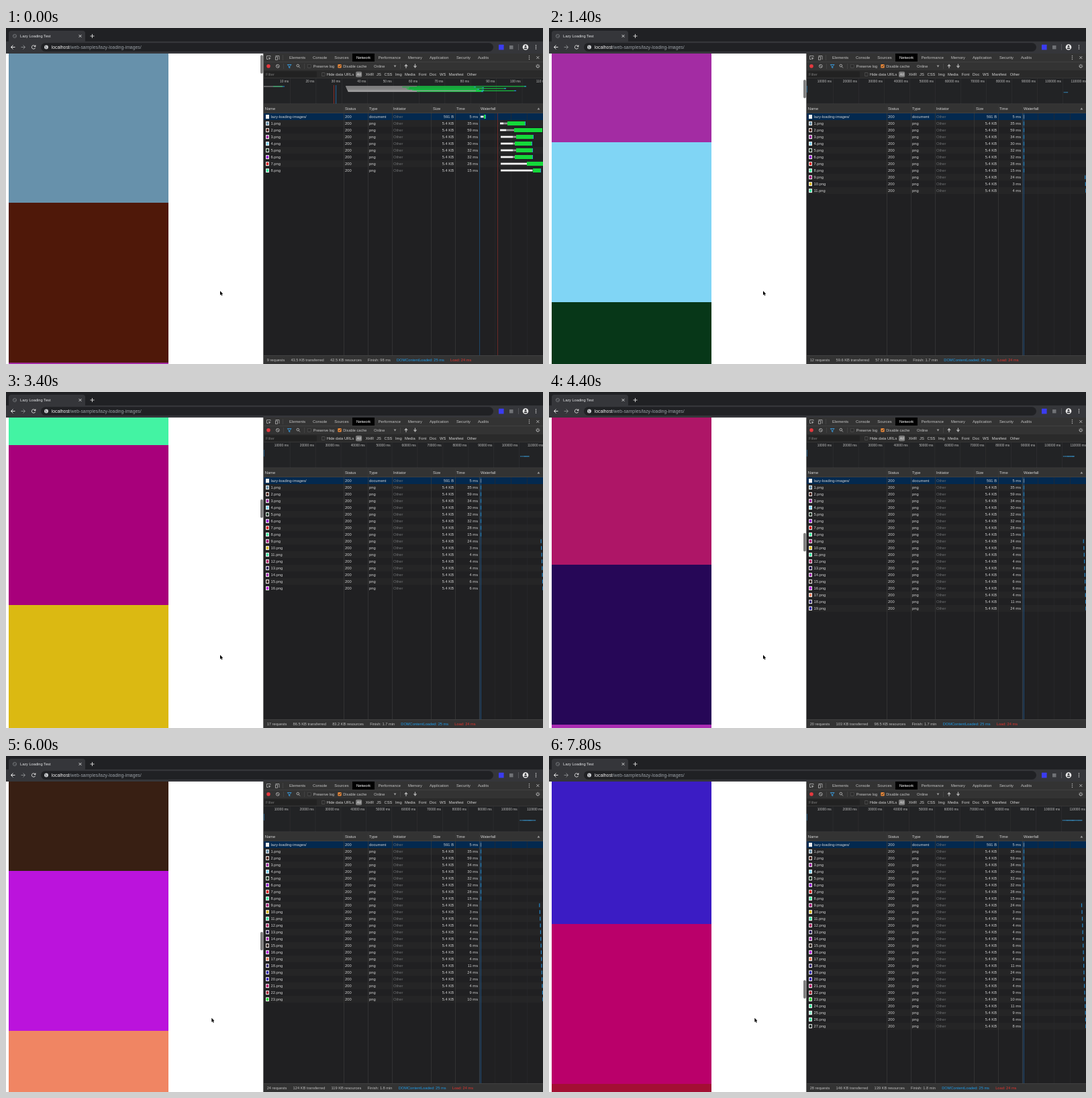
An HTML page with a canvas that plays this animation: 800x500 px, repeating every 8000 ms.

```html
<!DOCTYPE html>
<html lang="en">
<head>
<meta charset="utf-8">
<title>Lazy Loading Test</title>
<style>
html, body { margin: 0; width: 100%; height: 100%; overflow: hidden; background: #202124; }
canvas { display: block; width: 800px; height: 500px; }
</style>
</head>
<body>
<canvas id="stage" width="800" height="500"></canvas>
<script>
const ctx = document.getElementById('stage').getContext('2d');
const LOOP = 8000, STEP = 200, IMG = 238, LEAD = 1836;
const FONT = '"Liberation Sans", Arial, sans-serif';
const colors = ('#6791ab #4f1809 #a32ca3 #80d5f5 #073718 #9809d4 #dc0a0e #43f3a3 #a8007b ' +
  '#dbb912 #3fe9a5 #ae1667 #260757 #aa2cb2 #381f13 #bb13dc #f08563 #3a2a78 #2a1fae ' +
  '#3b1cc4 #ba006a #a30f33 #18e02c #38e89c #8ff0cf #3ce8a0 #0a2418').split(' ');
const loadMs = [35, 59, 34, 30, 32, 32, 28, 15, 24, 3, 4, 4, 4, 4, 6, 6, 4, 11, 24, 2, 4, 9, 10, 11, 9, 6, 8];

// Scroll offset over time steps, as a smooth curve through a few points
const knots = [[0, 20], [7, 586], [11, 1126], [17, 1867], [22, 2641], [30, 3441], [39, 4552]];
const slope = i => {
  const a = knots[Math.max(0, i - 1)], b = knots[Math.min(knots.length - 1, i + 1)];
  return (b[1] - a[1]) / (b[0] - a[0]);
};
function scrollAt(k) {
  let i = 0;
  while (i < knots.length - 2 && k > knots[i + 1][0]) i++;
  const [x0, y0] = knots[i], [x1, y1] = knots[i + 1];
  const w = x1 - x0, u = (k - x0) / w, v = 1 - u;
  return y0 * (1 + 2 * u) * v * v + slope(i) * w * u * v * v +
         y1 * u * u * (3 - 2 * u) - slope(i + 1) * w * u * u * v;
}
const countAt = k => Math.min(27, Math.floor((scrollAt(k) + LEAD) / IMG) + 1);

// Request time in seconds of each image that loads while scrolling
const startTime = [];
for (let k = 0; k < 40; k += 0.1) {
  const n = countAt(k);
  while (startTime.length < n) startTime.push(startTime.length < 8 ? 0 : 100.6 + k * STEP / 1000);
}

function rect(x, y, w, h, color) {
  ctx.fillStyle = color;
  ctx.fillRect(x, y, w, h);
}
function pill(x, y, w, h, r, color) {
  ctx.fillStyle = color;
  ctx.beginPath();
  ctx.roundRect(x, y, w, h, r);
  ctx.fill();
}
function dot(x, y, r, color) {
  ctx.fillStyle = color;
  ctx.beginPath();
  ctx.arc(x, y, r, 0, 7);
  ctx.fill();
}
function ring(x, y, r, color, from = 0, to = 7) {
  ctx.strokeStyle = color;
  ctx.lineWidth = 0.9;
  ctx.beginPath();
  ctx.arc(x, y, r, from, to);
  ctx.stroke();
}
function line(color, width, ...p) {
  ctx.strokeStyle = color;
  ctx.lineWidth = width;
  ctx.beginPath();
  for (let i = 0; i < p.length; i += 2) ctx.lineTo(p[i], p[i + 1]);
  ctx.stroke();
}
function shape(color, ...p) {
  ctx.fillStyle = color;
  ctx.beginPath();
  for (let i = 0; i < p.length; i += 2) ctx.lineTo(p[i], p[i + 1]);
  ctx.fill();
}
function text(s, x, y, color = '#d2d2d2', size = 5.8, align = 'left') {
  ctx.font = size + 'px ' + FONT;
  ctx.textAlign = align;
  ctx.fillStyle = color;
  ctx.fillText(s, x, y);
}
function menuDots(x, y, color) {
  for (const d of [-2.5, 0, 2.5]) dot(x, y + d, 0.75, color);
}
function cross(x, y, r, color) {
  line(color, 0.9, x - r, y - r, x + r, y + r);
  line(color, 0.9, x + r, y - r, x - r, y + r);
}
function arrow(x, y, dir, color) {
  line(color, 1, x - 3 * dir, y, x + 3 * dir, y);
  line(color, 1, x, y - 3, x + 3 * dir, y, x, y + 3);
}
function gear(x, y) {
  ring(x, y, 1.8, '#b0b0b0');
  for (let a = 0; a < 6.2; a += Math.PI / 4) {
    const c = Math.cos(a), s = Math.sin(a);
    line('#b0b0b0', 0.9, x + 2 * c, y + 2 * s, x + 3.1 * c, y + 3.1 * s);
  }
}
function checkbox(x, y, on) {
  pill(x, y, 5.4, 5.4, 1, on ? '#e8883a' : '#565656');
  if (on) line('#222', 0.9, x + 1.2, y + 2.8, x + 2.3, y + 4, x + 4.3, y + 1.3);
  else pill(x + 0.6, y + 0.6, 4.2, 4.2, 0.6, '#2c2c2c');
}

function drawBrowser() {
  rect(0, 0, 800, 20, '#202124');
  pill(4, 4, 114, 20, 4, '#35363a');
  rect(0, 20, 800, 18, '#35363a');
  ring(13, 12, 2.6, '#73767a');
  line('#73767a', 0.7, 11, 10.5, 13, 12.5, 15, 12);
  text('Lazy Loading Test', 21, 14, '#e4e5e7', 5.65);
  cross(110.5, 12, 1.9, '#e0e0e0');
  line('#dcdcdc', 0.9, 125.5, 12, 131.5, 12);
  line('#dcdcdc', 0.9, 128.5, 9, 128.5, 15);

  arrow(10.5, 28.5, -1, '#e6e6e6');
  arrow(25.5, 28.5, 1, '#85878a');
  ring(41, 28.5, 2.7, '#dedede', 0.3, 5.5);
  shape('#dedede', 44.3, 25, 44.3, 28, 41.4, 28);
  pill(52, 22.3, 674, 12.6, 6.3, '#202124');
  dot(60, 28.5, 3, '#c9cbce');
  line('#55585c', 0.8, 58, 27, 60, 28.5, 59.5, 30.5);
  text('localhost', 67.7, 30.9, '#f0f0f0', 6.85);
  const w = ctx.measureText('localhost').width;
  text('/web-samples/lazy-loading-images/', 67.7 + w, 30.9, '#9aa0a6', 6.85);
  pill(734, 24.8, 7.6, 7.8, 0.5, '#3b3cf0');
  rect(750, 26, 5.5, 5.5, '#707276');
  rect(763, 24, 0.7, 9, '#606266');
  dot(774, 28.5, 4.3, '#eeeeee');
  dot(774, 27.2, 1.4, '#35363a');
  pill(771.6, 29.3, 4.8, 2, 1, '#35363a');
  menuDots(789.5, 28.5, '#e4e4e4');
}

function drawPage(scroll) {
  ctx.save();
  ctx.beginPath();
  ctx.rect(0, 38, 383.5, 462);
  ctx.clip();
  rect(0, 38, 384, 462, '#fff');
  colors.forEach((c, i) => {
    const y = Math.round(42 + i * IMG - scroll);
    if (y < 500 && y > -IMG) rect(4, y, 238, IMG, c);
  });
  pill(379, 39 + scroll * 0.0647, 3.8, 27.5, 1.9, '#7d7d7d');
  ctx.restore();
}

function drawTools() {
  rect(383.5, 38, 416.5, 462, '#242424');
  rect(384, 38, 416, 12, '#333333');
  rect(384, 50, 416, 0.8, '#484848');
  line('#b0b0b0', 0.8, 391, 46.5, 388.5, 46.5, 388.5, 41.5, 394, 41.5, 394, 43);
  shape('#b0b0b0', 391, 43.5, 395, 45, 393.2, 45.6, 392.3, 47.5);
  line('#b0b0b0', 0.8, 401.5, 41.5, 407, 41.5, 407, 47);
  ctx.strokeRect(401.5, 43, 3, 4.3);
  rect(412, 40, 0.7, 8, '#4a4a4a');
  rect(516, 38, 33, 12, '#000');
  const tabs = [['Elements', 422], ['Console', 457], ['Sources', 489.3], ['Network', 522], ['Performance', 554.7],
    ['Memory', 599], ['Application', 631], ['Security', 671], ['Audits', 703]];
  for (const [s, x] of tabs) text(s, x, 46, s === 'Network' ? '#fff' : '#c4c4c4');
  menuDots(779.5, 44, '#b5b5b5');
  cross(792.3, 44, 2, '#b5b5b5');

  rect(384, 51, 416, 12.5, '#333333');
  dot(391, 56.8, 2.8, '#e5393f');
  ring(404.8, 56.8, 2.4, '#b0b0b0');
  line('#b0b0b0', 0.8, 403.1, 55.1, 406.5, 58.5);
  line('#3a9bdc', 0.9, 419.3, 54.5, 425, 54.5, 422.8, 57, 422.8, 59.5, 421.5, 59, 421.5, 57, 419.3, 54.5);
  ring(434.8, 56, 1.8, '#b0b0b0');
  line('#b0b0b0', 0.9, 436.1, 57.4, 438, 59.4);
  for (const x of [413, 444, 587]) rect(x, 53, 0.7, 8, '#4a4a4a');
  checkbox(449, 54, false);
  text('Preserve log', 457.8, 58.8, '#c4c4c4', 5.6);
  checkbox(494.3, 54, true);
  text('Disable cache', 502.3, 58.8, '#c4c4c4', 5.6);
  text('Online', 548, 58.8, '#c4c4c4', 5.7);
  shape('#a0a0a0', 577.7, 55.5, 581.3, 55.5, 579.5, 58.5);
  shape('#b0b0b0', 593.3, 57, 596, 53.5, 598.7, 57);
  rect(595.4, 57, 1.2, 2.8, '#b0b0b0');
  shape('#b0b0b0', 606.8, 56.3, 609.5, 59.8, 612.2, 56.3);
  rect(608.9, 53.5, 1.2, 2.8, '#b0b0b0');
  gear(792.3, 56.8);

  rect(384, 63.5, 416, 11, '#2a2a2a');
  rect(385, 64.5, 78, 9, '#222');
  text('Filter', 387, 71.2, '#777');
  checkbox(470, 66.3, false);
  text('Hide data URLs', 477.7, 71.1, '#d2d2d2', 5.75);
  pill(521, 64.8, 9.2, 8.4, 2, '#777');
  text('All', 522.5, 71.1, '#eee');
  const types = [['XHR', 535.7], ['JS', 552], ['CSS', 563.5], ['Img', 580], ['Media', 594], ['Font', 614.7],
    ['Doc', 631], ['WS', 646], ['Manifest', 659.7], ['Other', 686.7]];
  for (const [s, x] of types) text(s, x, 71.1);
  rect(384, 74.5, 416, 0.7, '#444');
}

function drawOverview(n, sec) {
  const first = n === 8;
  const step = first ? 38.4 : 38.05 - 0.03 * sec;
  const x0 = first ? 384.7 : 384.9;
  rect(384, 75, 416, 38, '#222325');
  for (let i = 1; i <= 11; i++) {
    const x = x0 + i * step;
    rect(x, 75, 0.7, 38, '#303032');
    text(i * (first ? 10 : 10000) + ' ms', x - 2, 81.2, '#c0c0c0', 4.8, 'right');
  }
  if (first) {
    rect(384, 86.5, 28, 1, '#a0a0a0');
    rect(398, 86.5, 14, 1, '#25b96b');
    rect(412, 86.5, 3, 1, '#2b8de0');
    rect(488.2, 85, 0.8, 28, '#a3312f');
    rect(491.3, 85, 0.8, 28, '#2878b8');
    const ends = [775, 700, 712, 745, 705, 712, 760, 711];
    ends.forEach((end, i) => {
      const y = 86.3 + i * 1.1, mid = [612, 590, 600, 596, 598, 605, 700, 612][i];
      rect(506 + i * 0.5, y, mid - 506, 1.1, '#9d9d9d');
      rect(mid, y, end - mid, 1.1, '#16cf45');
      rect(end - 3, y, 3, 1.1, '#2b8de0');
    });
  } else {
    rect(384, 86, 0.8, 10, '#24689a');
    for (let i = 8; i < n; i++) rect(x0 + startTime[i] / 10 * step - 1, 95.3, 1.8, 1, '#399bd5');
  }
  rect(384, 112.6, 416, 0.9, '#4a4a4a');
}

function drawFirstBars() {
  // wait start, wait end, green start, green end
  const bars = [[707, 711, 712, 715], [736, 741, 747, 774], [736, 745, 757, 799], [737, 755, 760, 786],
    [737, 755, 758, 784], [737, 755, 760, 785], [737, 755, 758, 785], [737, 776, 776, 800], [737, 784, 785, 797]];
  bars.forEach(([a, b, c, d], i) => {
    const y = 132 + i * 10;
    rect(a, y - 1.4, b - a, 2.8, '#f4f4f4');
    rect(b, y - 1.4, c - b, 2.8, '#949494');
    rect(c, y - 3, d - c, 6, '#14d83a');
    if (d < 799) rect(d - 0.9, y - 3, 0.9, 6, '#2b8de0');
  });
}

function drawTable(n) {
  rect(384, 113.5, 416, 13, '#333333');
  for (let i = 0; i < 36; i++) rect(384, 127 + i * 10, 416, 10, i <= n && i % 2 ? '#252526' : '#202022');
  rect(384, 127, 416, 10, '#03294f');
  for (const x of [503, 539, 575, 633, 669, 705]) rect(x, 113.5, 0.7, 373.5, '#3b3b3c');
  for (const x of [728, 752, 776]) rect(x, 127, 0.6, 360, '#2b2b2d');
  rect(384, 126.3, 416, 0.7, '#484848');
  const heads = [['Name', 385.7], ['Status', 505], ['Type', 541], ['Initiator', 577], ['Size', 636], ['Time', 671], ['Waterfall', 707]];
  for (const [s, x] of heads) text(s, x, 122.1);
  shape('#a0a0a0', 791.5, 121.4, 795.3, 121.4, 793.4, 118.4);

  const first = n === 8;
  rect(705.2, 127, 0.9, 360, first ? '#1c4a70' : '#34495c');
  if (first) rect(732.1, 127, 0.8, 360, '#7d2d29');
  else rect(707.1, 127, 0.9, 360, '#1d5180');

  for (let i = 0; i <= n; i++) {
    const y = 134.1 + i * 10;
    rect(387, y - 5, 5, 6, '#f2f2f2');
    if (i) rect(387.9, y - 3.9, 3.2, 3.8, colors[i - 1]);
    text(i ? i + '.png' : 'lazy-loading-images/', 394.5, y);
    text('200', 505, y);
    text(i ? 'png' : 'document', 541, y);
    text('Other', 577, y, '#707274');
    text(i ? '5.4 KB' : '591 B', 667, y, undefined, 5.75, 'right');
    text((i ? loadMs[i - 1] : 5) + ' ms', 703, y, undefined, 5.75, 'right');
    if (!first) {
      const x = 707 + 92.3 * (i > 8 ? startTime[i - 1] / startTime[n - 1] : 0);
      rect(x - 0.1, y - 4.8, 1.2, 5.6, i ? '#2588c8' : '#6f8ba5');
    }
  }
  if (first) drawFirstBars();
}

function drawStatus(n) {
  rect(384, 487, 416, 13, '#333333');
  rect(384, 487, 416, 0.7, '#484848');
  const kb = v => (v < 100 ? v.toFixed(1) : Math.round(v)) + ' KB ';
  const finish = n === 8 ? '98 ms' : (startTime[n - 1] / 60).toFixed(1) + ' min';
  const parts = [
    [n + 1 + ' requests'],
    [kb(43.5 + 5.375 * (n - 8)) + 'transferred'],
    [kb(42.5 + 5.088 * (n - 8)) + 'resources'],
    ['Finish: ' + finish],
    ['DOMContentLoaded: 25 ms', '#1e9be8'],
    ['Load: 24 ms', '#e0352f']
  ];
  let x = 388.7;
  for (const [s, color = '#bdbdbd'] of parts) {
    text(s, x, 495.8, color, 5.7);
    x += ctx.measureText(s).width + 9.2;
  }
}

function drawCursor(k) {
  const u = Math.min(1, Math.max(0, (k - 23) / 3));
  const x = 319 - 12.7 * u * u * (3 - 2 * u), y = 391.3 - 1.6 * u;
  const p = [0, 0, 0, 6.2, 1.4, 5, 2.4, 7.2, 3.4, 6.7, 2.5, 4.6, 4.2, 4.5, 0, 0].map((v, i) => v + (i % 2 ? y : x));
  line('#fff', 1.2, ...p);
  shape('#000', ...p);
}

function draw() {
  const k = Math.floor(performance.now() % LOOP / STEP);
  const n = countAt(k);
  drawPage(scrollAt(k));
  drawBrowser();
  drawTools();
  drawOverview(n, k * STEP / 1000);
  drawTable(n);
  drawStatus(n);
  drawCursor(k);
  requestAnimationFrame(draw);
}
draw();
</script>
</body>
</html>
```
